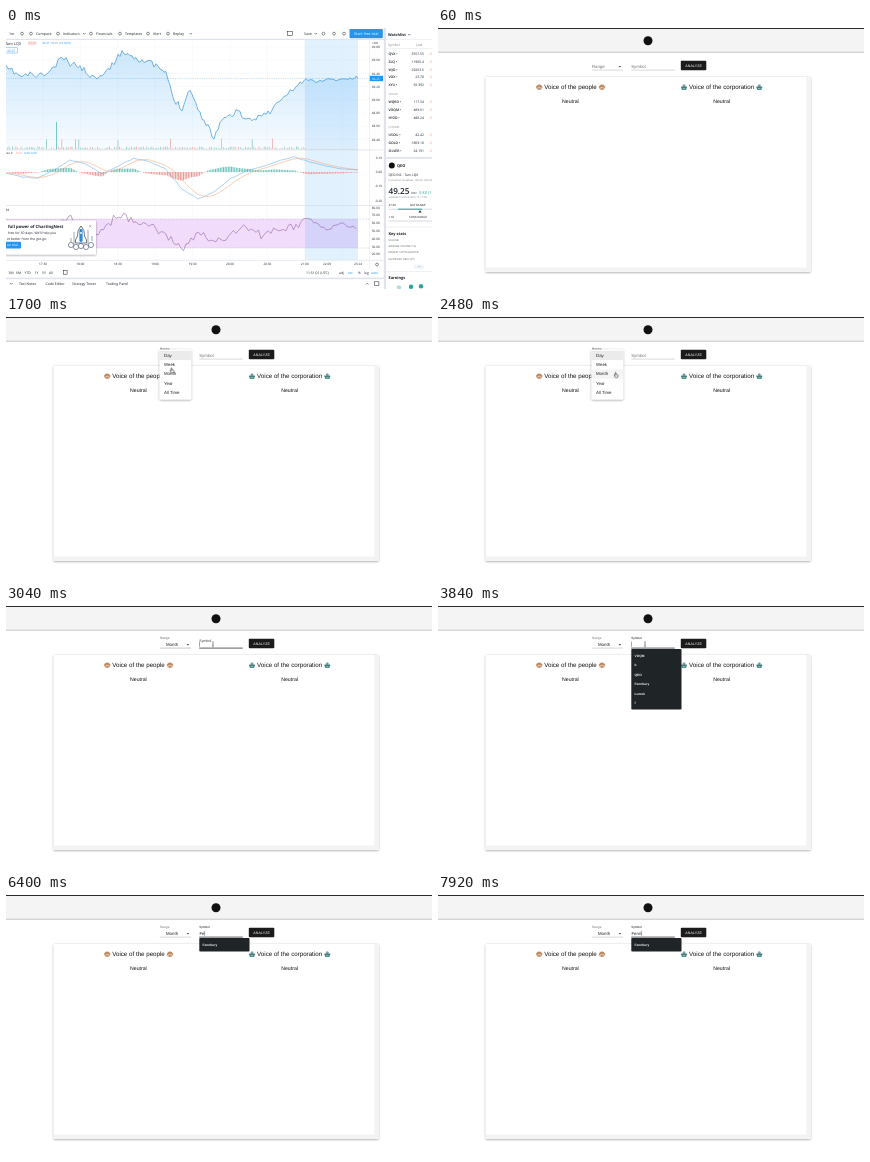
An HTML page that plays this animation: 426 px wide and 261 px high, repeating every 8 s.

```html
<!DOCTYPE html>
<html lang="en">
<head>
<meta charset="utf-8">
<title>Voice analyzer</title>
<style>
html, body { margin: 0; width: 100%; height: 100%; overflow: hidden; background: #fff; }
svg { display: block; width: 100%; height: 100%; font-family: "Liberation Sans", Arial, sans-serif; text-rendering: geometricPrecision; }
.mid { text-anchor: middle; }
.field { font-size: 4.35px; fill: #222; }
.anim, .anim * { animation-duration: 8s; animation-iteration-count: infinite; animation-timing-function: step-end; }

#chart { font-family: "Open Sans", "Noto Sans", sans-serif; font-weight: 500; animation-name: chart; }
@keyframes chart { 0% { visibility: visible } .25%, 100% { visibility: hidden } }

/* pointer */
#mouse { animation-name: mouse; animation-timing-function: ease-in-out; }
@keyframes mouse {
  0%, 1.5% { transform: translate(152px, -12px) }
  10.25%, 16.5% { transform: translate(165px, 41px) }
  23.75%, 26.25% { transform: translate(166px, 57px) }
  27%, 29.25% { transform: translate(165.6px, 57.5px) }
  31%, 32.25% { transform: translate(178px, 57.6px) }
  36%, 100% { transform: translate(207px, 38.3px) }
}
#arrow { animation-name: arrow; }
@keyframes arrow { 0% { visibility: visible } 10% { visibility: hidden } 33% { visibility: visible } 35.25%, 100% { visibility: hidden } }
#hand { animation-name: hand; }
@keyframes hand { 0% { visibility: hidden } 10% { visibility: visible } 33%, 100% { visibility: hidden } }
#beam { animation-name: beam; }
@keyframes beam { 0% { visibility: hidden } 35.25% { visibility: visible } 77.25%, 100% { visibility: hidden } }

/* range select */
#rangeLine { animation-name: rangeLine; animation-timing-function: ease-out; }
@keyframes rangeLine {
  0%, 10.5% { stroke: #8e8e8e; stroke-width: .35px }
  13.25%, 36.5% { stroke: #1c1c1c; stroke-width: .7px }
  39%, 100% { stroke: #8e8e8e; stroke-width: .35px }
}
#rangeLabel { transform-origin: 153.9px 40px; animation-name: rangeLabel; animation-timing-function: ease-out; }
@keyframes rangeLabel {
  0%, 16.75% { transform: none; fill: #757575 }
  19.25%, 36.5% { transform: translateY(-6.7px) scale(.75); fill: #222 }
  39%, 100% { transform: translateY(-6.7px) scale(.75); fill: #757575 }
}
#rangeValue { animation-name: rangeValue; }
@keyframes rangeValue { 0% { visibility: hidden } 32%, 100% { visibility: visible } }
#menu { transform-origin: 169px 39px; animation-name: menu; animation-timing-function: ease-out; }
@keyframes menu {
  0%, 16.75% { opacity: 0; transform: scale(.75, .56) }
  20%, 32% { opacity: 1; transform: none }
  34.25%, 100% { opacity: 0; transform: none }
}
#hover { animation-name: hover; }
@keyframes hover { 0% { visibility: hidden } 23% { visibility: visible } 34.25%, 100% { visibility: hidden } }

/* symbol input */
#symLine { animation-name: symLine; animation-timing-function: ease-out; }
@keyframes symLine {
  0%, 35.25% { stroke: #8e8e8e; stroke-width: .35px }
  37.5%, 100% { stroke: #1c1c1c; stroke-width: .7px }
}
#symLabel { transform-origin: 193.2px 40px; animation-name: symLabel; animation-timing-function: ease-out; }
@keyframes symLabel {
  0%, 36.75% { transform: none; fill: #757575 }
  40%, 100% { transform: translateY(-6.7px) scale(.72); fill: #111 }
}
#caret { animation-name: blink, caret; }
@keyframes blink {
  0% { visibility: hidden } 36.75% { visibility: visible }
  44.75% { visibility: hidden } 48% { visibility: visible }
  55% { visibility: hidden } 62.5% { visibility: visible }
  70% { visibility: hidden } 77% { visibility: visible }
  91.5% { visibility: hidden } 98.25%, 100% { visibility: visible }
}
@keyframes caret {
  0% { transform: none } 77.25% { transform: translateX(2.7px) }
  80% { transform: translateX(5.1px) } 83% { transform: translateX(7.5px) }
  85%, 100% { transform: translateX(9.9px) }
}
#k1 { animation-name: k1; } #k2 { animation-name: k2; } #k3 { animation-name: k3; } #k4 { animation-name: k4; }
@keyframes k1 { 0% { visibility: hidden } 77.25%, 100% { visibility: visible } }
@keyframes k2 { 0% { visibility: hidden } 80%, 100% { visibility: visible } }
@keyframes k3 { 0% { visibility: hidden } 83%, 100% { visibility: visible } }
@keyframes k4 { 0% { visibility: hidden } 85%, 100% { visibility: visible } }

/* suggestions */
#list { font-size: 3.25px; font-weight: bold; fill: #f4f4f4; }
#listBox { fill: #1f2426; animation-name: listBox; }
@keyframes listBox {
  0% { visibility: hidden; height: 60.5px } 38.75% { visibility: visible; height: 60.5px }
  77.25% { visibility: visible; height: 22.9px } 80%, 100% { visibility: visible; height: 13.5px }
}
#all { animation-name: all; }
@keyframes all { 0% { visibility: hidden } 38.75% { visibility: visible } 77.25%, 100% { visibility: hidden } }
#hit { animation-name: k1; }
#hit2 { animation-name: hit2; }
@keyframes hit2 { 0% { visibility: hidden } 77.25% { visibility: visible } 80%, 100% { visibility: hidden } }
</style>
</head>
<body>
<svg viewBox="0 0 426 261" preserveAspectRatio="none">
  <defs>
    <filter id="soft" x="-20%" y="-20%" width="140%" height="140%"><feDropShadow dx="0" dy=".7" stdDeviation=".9" flood-opacity=".4"/></filter>
    <linearGradient id="area" x1="0" y1="0" x2="0" y2="1">
      <stop offset="0" stop-color="#2196f3" stop-opacity=".23"/><stop offset="1" stop-color="#2196f3" stop-opacity=".03"/>
    </linearGradient>
    <g id="people">
      <circle cx="-2.4" cy="-.3" r="1" fill="#d0a684"/><circle cx="2.4" cy="-.3" r="1" fill="#d0a684"/>
      <circle r="2.7" fill="#bd8a66"/><ellipse cy=".5" rx="2.1" ry="1.8" fill="#deb894"/>
      <path d="M-2-.8H2M-1 1.3H1" stroke="#a06f4e" stroke-width=".5"/>
    </g>
    <g id="corp">
      <circle cy="-1.5" r="1.5" fill="#7fa0ab"/>
      <path d="M-3-.4H3L2.1 2.8H-2.1Z" fill="#458f8b"/>
      <path d="M-2.9 0H2.9" stroke="#4d6a7d" stroke-width=".8"/>
      <path d="M-1 1.4H1" stroke="#b4d9d0" stroke-width=".7"/>
    </g>
  </defs>

  <rect width="426" height="261" fill="#fff"/>
  <rect width="426" height="24" fill="#f4f4f4"/>
  <rect width="426" height="1" fill="#2b2b2b"/>
  <rect y="23.8" width="426" height=".8" fill="#b9b9b9"/>
  <circle cx="210" cy="12.7" r="4.5" fill="#111"/>

  <g filter="url(#soft)"><rect x="47.7" y="49" width="324.8" height="194.8" fill="#fff"/></g>
  <path d="M368.3 49H372.5V243.8H47.7V239.6H368.3Z" fill="#f3f3f3"/>
  <g class="mid" fill="#111">
    <text x="132.5" y="61.3" font-size="6.2">Voice of the people</text>
    <text x="283.6" y="61.3" font-size="6.2">Voice of the corporation</text>
    <text x="132.4" y="75.3" font-size="5.2">Neutral</text>
    <text x="283.6" y="75.3" font-size="5.2">Neutral</text>
  </g>
  <use href="#people" x="101.2" y="59.2"/><use href="#people" x="164" y="59.2"/>
  <use href="#corp" x="246" y="59.2"/><use href="#corp" x="321.3" y="59.2"/>

  <rect x="242.8" y="32.8" width="25.5" height="9.4" rx=".9" fill="#1b1b1b"/>
  <text class="mid" x="255.7" y="38.8" font-size="3.6" letter-spacing=".1" fill="#fff">ANALYZE</text>

  <g class="anim">
    <path id="rangeLine" d="M153.9 42.1H185"/>
    <path d="M180.6 38.1H183.2L181.9 39.5Z" fill="#444"/>
    <text id="rangeLabel" class="field" x="153.9" y="40">Range</text>
    <text id="rangeValue" class="field" x="160" y="39.7">Month</text>

    <path id="symLine" d="M193.2 42.1H236.8"/>
    <text id="symLabel" class="field" x="193.2" y="40">Symbol</text>
    <text class="field" x="193.4" y="39.8"><tspan id="k1">F</tspan><tspan id="k2">e</tspan><tspan id="k3">n</tspan><tspan id="k4">n</tspan></text>
    <rect id="caret" x="193.4" y="35.8" width=".4" height="5" fill="#222"/>

    <g id="list">
      <rect id="listBox" x="193.3" y="43" width="50.2" height="60.5" rx=".8"/>
      <g id="all">
        <text x="196.5" y="51">VOQM</text><text x="196.5" y="60.4">b</text>
        <text x="196.5" y="69.8">QEO</text><text x="196.5" y="79.2">Fennbury</text>
        <text x="196.5" y="88.6">Lumok</text><text x="196.5" y="98">f</text>
      </g>
      <text id="hit" x="196.5" y="51">Fennbury</text>
      <text id="hit2" x="196.5" y="60.4">f</text>
    </g>

    <g id="menu">
      <g filter="url(#soft)"><rect x="153.6" y="32.4" width="31.6" height="50" rx=".9" fill="#fff"/></g>
      <rect x="153.6" y="33.8" width="31.6" height="9.3" fill="#ebebeb"/>
      <rect id="hover" x="153.6" y="52.4" width="31.6" height="9.3" fill="#f4f4f4"/>
      <g class="field">
        <text x="158" y="39.8">Day</text><text x="158" y="49.1">Week</text><text x="158" y="58.4">Month</text>
        <text x="158" y="67.8">Year</text><text x="158" y="77.1">All Time</text>
      </g>
    </g>

    <g id="mouse">
      <path id="arrow" d="M0-2V3.4L1.3 2.3L2.2 4.3L3 4L2.1 2L3.8 1.9Z" fill="#111" stroke="#fff" stroke-width=".4"/>
      <path id="hand" d="M-.8-1.8Q-.4-2.5 0-1.8V-.2L1.7.2Q2.2.4 2 1.6L1.6 2.8H-.7L-2 .8Q-1.7.1-.8.8Z" fill="#fff" stroke="#111" stroke-width=".55"/>
      <path id="beam" d="M-1-2.4Q0-2.4 0-1.8Q0-2.4 1-2.4M0-2V2M-1 2.4Q0 2.4 0 1.8Q0 2.4 1 2.4M-.6.6H.6" fill="none" stroke="#222" stroke-width=".4"/>
    </g>

    <g id="chart"></g>
  </g>
</svg>
<script>
const root = document.getElementById('chart');
const INK = '#1b1f2a', GREY = '#7d818c', BLUE = '#2196f3', TEAL = '#6cc3ba', RED = '#f09a96';

function add(tag, attrs, text) {
  const el = document.createElementNS('http://www.w3.org/2000/svg', tag);
  for (const k in attrs) el.setAttribute(k, attrs[k]);
  if (text) el.textContent = text;
  root.appendChild(el);
}
const box = (x, y, width, height, fill, more) => add('rect', { x, y, width, height, fill, ...more });
const line = (d, stroke, width = .5, more) => add('path', { d, stroke, 'stroke-width': width, fill: 'none', ...more });
const txt = (x, y, s, size = 3.5, fill = INK, more) => add('text', { x, y, 'font-size': size, fill, ...more }, s);
const row = (y, items, size, fill, more) => items.forEach(([x, s]) => txt(x, y, s, size, fill, more));
const ring = (cx, cy, r) => add('circle', { cx, cy, r, fill: 'none', stroke: INK, 'stroke-width': .5 });
const bold = { 'font-weight': 'bold' }, mid = { 'text-anchor': 'middle' }, end = { 'text-anchor': 'end' };

let seed = 11;
const rnd = () => (seed = seed * 16807 % 2147483647) / 2147483647;

// linear interpolation through evenly spaced values
const curve = (vals, step) => x => {
  const p = Math.max(0, Math.min(x / step, vals.length - 1.001)), i = Math.floor(p);
  return vals[i] + (vals[i + 1] - vals[i]) * (p - i);
};
function trace(fn, noise = 0, step = 2) {
  let d = '';
  for (let x = 0; x <= 352; x += step) {
    const n = noise * (x > 300 ? .4 : 1) * (rnd() - .5);
    d += (d ? 'L' : 'M') + x + ' ' + (fn(x) + n).toFixed(1);
  }
  return d;
}

const price = curve([40, 44, 49, 46, 48, 46, 40, 29, 36, 37, 44, 50, 45, 41, 27, 24, 29, 32, 35, 39, 46, 72, 80, 60, 82,
  95, 110, 90, 89, 81, 94, 92, 85, 85, 74, 68, 60, 54, 52, 54, 51, 52, 51, 51, 49], 8);
const macd = curve([145, 149, 150, 142, 132, 136, 146, 138, 130, 134, 141, 161, 171, 164, 151, 143, 139, 133, 129, 134, 138, 141, 142], 16);
const signal = x => (macd(x) + macd(x - 5) + macd(x - 10) + macd(x - 15)) / 4;
const rsi = curve([203, 200, 205, 198, 190, 205, 203, 186, 193, 197, 208, 221, 204, 214, 207, 198, 208, 201, 199, 191, 201, 196, 200], 16);

function drawPlots() {
  box(0, 0, 426, 261, '#fff');
  for (let x = 37; x < 350; x += 37.4) line(`M${x} 12V232`, '#eef1f5', .4);
  for (let y = 19; y < 120; y += 13.2) line(`M0 ${y}H363`, '#eef1f5', .4);

  box(0, 191, 352, 29, '#f1dcfb');
  box(299, 12, 53, 220, BLUE, { opacity: .13 });

  const d = trace(price, 6);
  add('path', { d: d + 'L352 122L0 122Z', fill: 'url(#area)' });
  for (let x = 1; x < 352; x += 1.7) {
    const spike = rnd() > .96 ? 8 : 0, h = x > 299 ? .5 : .6 + rnd() * 2.5 + spike;
    box(x, 121.5 - h, .8, h, rnd() > .5 ? TEAL : RED, { opacity: .8 });
  }
  box(50, 94, .9, 27.5, TEAL);
  line(d, '#3a97da', .7);
  line('M0 50.5H363', BLUE, .35, { 'stroke-dasharray': '.8 1' });

  for (let x = 1; x < 352; x += 1.6) {
    const h = (signal(x) - macd(x)) * .9;
    box(x, Math.min(144, 144 - h), 1, Math.abs(h) + .15, h > 0 ? TEAL : RED);
  }
  line(trace(macd, .8), '#5aa9e0', .5);
  line(trace(signal), '#f0a070', .5);

  line('M0 191H363M0 220H363', '#a79bb0', .35, { 'stroke-dasharray': '1.5 1.2' });
  line(trace(rsi, 8, 2.5), '#8a5aa3', .55);
  line('M0 122H377M0 177.5H377M0 232.3H377', '#d6dae2', .6);
  line('M363.5 12V241', '#e0e3eb', .5);
}

function drawLabels() {
  row(6.8, [[3, '1m'], [30, 'Compare'], [57, 'Indicators'], [90, 'Financials'], [119, 'Templates'], [147, 'Alert'], [167, 'Replay'], [298, 'Save']], 3.6);
  [16, 25, 52, 85, 114, 142, 162, 317.5, 328, 338].forEach(x => ring(x, 5.6, 1.4));
  add('rect', { x: 281.5, y: 3.5, width: 5, height: 4, fill: 'none', stroke: INK, 'stroke-width': .5 });
  line('M77 5L78.3 6.3L79.6 5M183.5 5L184.8 6.3L186.1 5M308.5 5L309.8 6.3L311.1 5', INK);
  box(343.5, 1, 33.3, 9.3, BLUE, { rx: .8 });
  txt(360.2, 6.9, 'Start free trial', 3.8, '#fff', mid);
  box(0, 10.8, 378, 1.2, '#e0e3eb');

  txt(-1, 16.6, 'Tarn LQX', 3.9);
  box(22, 13.2, 8.5, 4, '#fbe3e3', { rx: 1 });
  txt(26.2, 16.3, '49.25', 2.8, RED, mid);
  txt(36, 16.4, '49.31  +0.01 (+0.02%)', 3, BLUE);
  add('rect', { x: -1, y: 19.6, width: 12.5, height: 5.4, rx: .7, fill: '#fff', stroke: BLUE, 'stroke-width': .4 });
  txt(1, 23.5, '49.25', 3.2, BLUE);
  txt(-1, 126.4, 'ose 9', 3);
  txt(9, 126.4, '-0.00', 3, RED);
  txt(18, 126.4, '0.00  0.00', 3, BLUE);
  txt(-1, 182.5, '.83', 3);

  txt(366.5, 16, 'USD', 2.8);
  for (let i = 0; i < 8; i++) txt(365.8, 20.2 + i * 13.2, (49.8 - i * .2).toFixed(2), 3.1);
  box(363.8, 47.8, 13.2, 5.4, BLUE);
  txt(365.8, 51.6, '49.25', 3.1, '#fff');
  ['0.10', '0.00', '-0.10', '-0.20'].forEach((s, i) => txt(376, 130.5 + i * 14.4, s, 3.1, INK, end));
  for (let i = 0; i < 7; i++) txt(365.8, 180.5 + i * 7.8, (80 - i * 10) + '.00', 3.1);

  '17:30 18:00 18:30 19:00 19:30 20:00 20:30 21:00'.split(' ').forEach((s, i) => txt(37 + i * 37.4, 237.4, s, 3.1, INK, mid));
  row(237.4, [[321, '22:09'], [352, '23:24']], 3.1, INK, mid);
  ring(371, 236.5, 1.4);
  row(245.6, [[2.5, '3M'], [10, '6M'], [18.5, 'YTD'], [28.5, '1Y'], [36, '5Y'], [43, 'All'], [300, '11:51:01 (UTC)'], [333, 'adj'], [352, '%'], [358, 'log']], 3.4);
  row(245.6, [[342, 'ext'], [365, 'auto']], 3.4, BLUE);
  add('rect', { x: 57.5, y: 242.6, width: 3.6, height: 3.6, fill: 'none', stroke: INK, 'stroke-width': .5 });
  box(0, 249.6, 378, 1.6, '#e0e3eb');
  row(257, [[13, 'Text Notes'], [39.5, 'Code Editor'], [66, 'Strategy Tester'], [100, 'Trading Panel']], 3.5);
  line('M4 255L5.3 256.3L6.6 255M360 256.5L361.3 255.2L362.6 256.5', INK);
  add('rect', { x: 368.5, y: 253.8, width: 4.4, height: 3.8, fill: 'none', stroke: INK, 'stroke-width': .5 });
}

function drawPromo() {
  box(-3, 192.5, 93, 34, '#fff', { rx: 1, filter: 'url(#soft)' });
  txt(2, 199.5, 'full power of ChartingNest', 4.2, INK, bold);
  txt(2, 206.3, 'free for 30 days. We\u2019ll help you', 3.4);
  txt(1, 212.2, 'et better from the get-go.', 3.4);
  box(-2, 213.8, 17, 6.8, BLUE, { rx: .8 });
  txt(1, 218.4, 'ee trial', 3.4, '#fff');
  line('M83 197L85.5 199.5M85.5 197L83 199.5', GREY);
  [[65, 217], [70, 219], [75, 218], [80, 219], [85, 217]].forEach(([cx, cy]) => add('circle', { cx, cy, r: 2.6, fill: '#fff', stroke: '#3b4a66', 'stroke-width': .6 }));
  line('M68 216V204M82 216V202M65 214V210M86 213V208', '#3b4a66');
  add('path', { d: 'M75 198Q79 202 78.5 208L80.5 212V215H69.5V212L71.5 208Q71 202 75 198Z', fill: '#fff', stroke: '#2b3f60', 'stroke-width': .7 });
  box(73.4, 201, 3.2, 13, '#2f86dd', { rx: 1.4 });
  add('circle', { cx: 75, cy: 205, r: 1, fill: '#fff' });
}

function drawSide() {
  box(377.8, 0, 49, 261, '#e0e3eb');
  box(380, 0, 46, 129, '#fff');
  box(380, 130.8, 46, 131, '#fff');
  txt(382, 7.8, 'Watchlist', 3.8, INK, bold);
  line('M402 6L403.3 7.3L404.6 6', INK);
  line('M380 11.5H426M380 20.5H426', '#e0e3eb');
  row(17.6, [[382, 'Symbol'], [410, 'Last']], 3.4, GREY);
  const groups = [
    [27.2, 'QVX 3557.55', 'ZLQ 11906.4', 'WJO 29263.5', 'VOX 23.70', 'XYU 92.392'],
    [75.2, 'WQRD 117.34', 'VOQM 489.61', 'HYZD 488.24'],
    [108.2, 'USOIL 42.42', 'GOLD 1869.10', 'SILVER 24.191']
  ];
  groups.forEach(([y, ...rows]) => rows.forEach((s, i) => {
    const [name, last] = s.split(' '), by = y + i * 7.75;
    txt(382.5, by, name + ' \u2022', 3.4, INK, { 'font-weight': 600 });
    txt(418, by, last, 3.4, INK, end);
    txt(423, by, '-0', 3.4, RED);
  }));
  row(67, [[382.5, 'STOCKS']], 2.6, GREY);
  row(100, [[382.5, 'FUTURES']], 2.6, GREY);

  add('circle', { cx: 385.8, cy: 137.5, r: 3, fill: '#111' });
  txt(391, 138.9, 'QEO', 3.8, INK, bold);
  txt(382.5, 148, 'QEO INC \u00b7 Tarn LQX', 3.3);
  txt(382.5, 153.2, 'Consumer Durables \u00b7 Motor Vehicles', 2.7, GREY);
  txt(382.5, 166, '49.25', 8.2, INK, { 'font-weight': 600 });
  txt(405, 166, 'USD', 2.8);
  txt(413, 166, '0.80 (1.65%)', 4, '#26a69a');
  txt(382.5, 170.4, '\u25cf MARKET CLOSED (NOV 13, 17:00)', 2.4, GREY);
  row(178, [[382.5, '47.30'], [404, 'DAY RANGE']], 2.9);
  row(189.8, [[382.5, '1.66'], [403, '52WK RANGE']], 2.9);
  line('M382.5 181.2H426', '#d5d9e0', 1);
  line('M392 181.2H416', '#26a69a', 1);
  add('path', { d: 'M412.5 184.5L414 182.3L415.5 184.5Z', fill: INK });
  line('M382.5 193H426', '#d5d9e0', 1);
  line('M380 199H426M380 243.5H426', '#e0e3eb');
  txt(382.5, 206.5, 'Key stats', 3.9, INK, bold);
  ['VOLUME', 'AVERAGE VOLUME (10)', 'MARKET CAPITALIZATION', 'DIVIDENDS YIELD (FY)'].forEach((s, i) => txt(382.5, 213.2 + i * 6.1, s, 2.6, '#5a5e69'));
  box(408, 236.6, 10, 4.4, '#f0f3fa', { rx: 1 });
  txt(413, 239.4, '\u2026', 3.5, INK, mid);
  txt(382.5, 251.3, 'Earnings', 3.9, INK, bold);
  [393, 405, 415].forEach((cx, i) => add('circle', { cx, cy: 259.4 - i * .6, r: 2.2, fill: i ? '#26a69a' : '#b2dfdb' }));
}

drawPlots();
drawLabels();
drawPromo();
drawSide();
</script>
</body>
</html>
```
